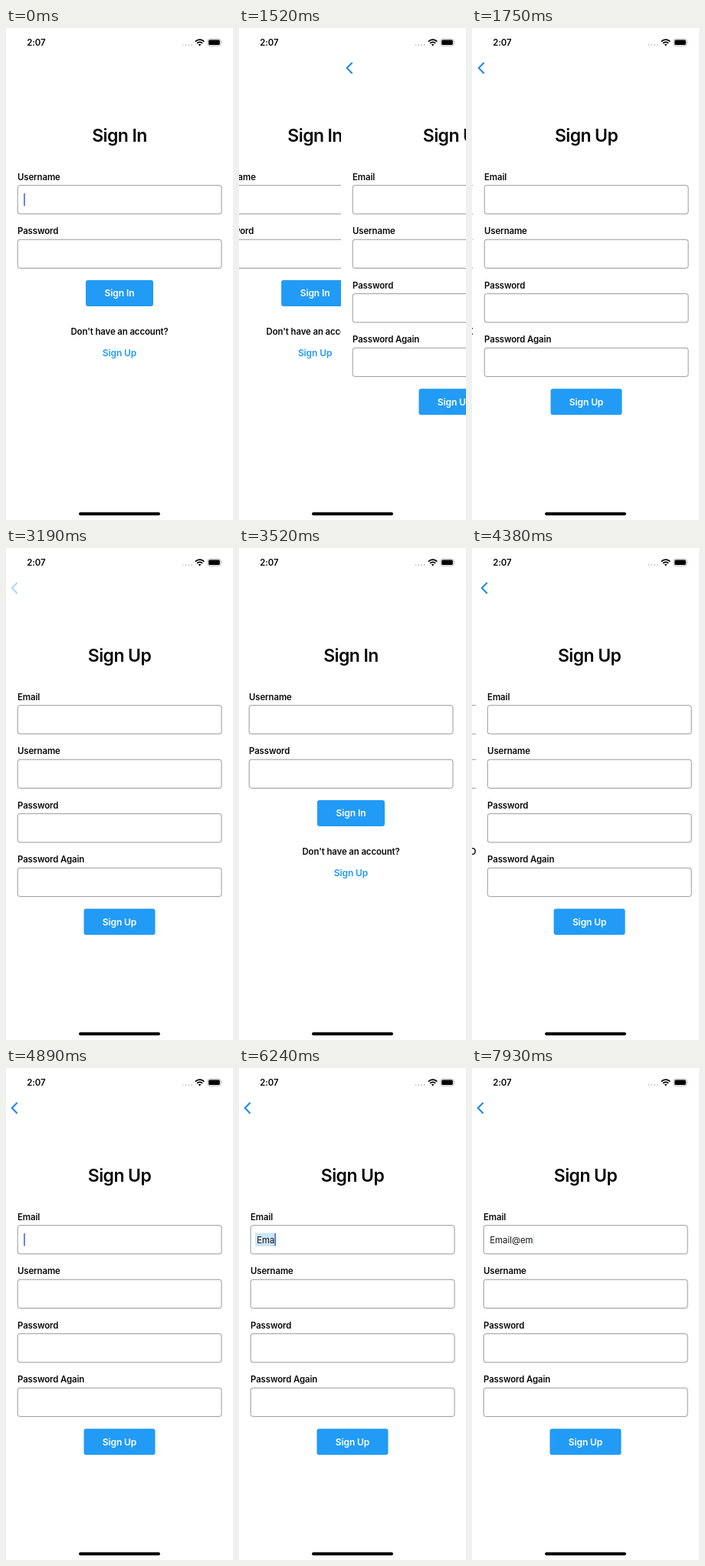
Recreate the animation shown at these times as an HTML page. Size 296x640 px, loop 8000 ms.

```html
<!DOCTYPE html>
<html lang="en">
<head>
<meta charset="utf-8">
<title>Sign in and sign up</title>
<style>
  html, body { margin: 0; width: 100%; height: 100%; overflow: hidden; background: #fff; }
  svg { display: block; width: 100%; height: 100%; }
  text { font-family: Inter, "Liberation Sans", sans-serif; font-size: 11.4px; font-weight: 600; letter-spacing: -.1px; fill: #0a0a0a; }
  .mid { text-anchor: middle; }
  .title { font-size: 23px; letter-spacing: -.6px; }
  .action { font-size: 12px; }
  .link { fill: #219bf5; }
  .on-button { fill: #fff; }
  .typed { font-weight: 400; letter-spacing: 0; white-space: pre; fill: #151515; }
  .field { fill: #fff; stroke: #8e8e8e; stroke-width: .9; }
  .button { fill: #219bf5; }
  .caret { fill: #426bd4; }
</style>
</head>
<body>
<svg viewBox="0 0 296 640" xmlns="http://www.w3.org/2000/svg">
  <rect width="296" height="640" fill="#fff"/>
  <g id="signIn"></g>
  <g id="signUp"></g>
  <g id="status">
    <text x="27.3" y="23">2:07</text>
    <g fill="#c4c4c4">
      <circle cx="230.5" cy="22" r=".9"/><circle cx="234.3" cy="22" r=".9"/>
      <circle cx="238.1" cy="22" r=".9"/><circle cx="241.9" cy="22" r=".9"/>
    </g>
    <g fill="none" stroke="#000" stroke-width="1.7">
      <path d="M246.9 17.6a8 8 0 0 1 11.4 0"/>
      <path d="M249.1 19.9a4.9 4.9 0 0 1 7 0"/>
    </g>
    <path d="M250.9 21.6a2.4 2.4 0 0 1 3.4 0l-1.7 1.8z"/>
    <rect x="263" y="14.4" width="17" height="8.8" rx="2.6" fill="none" stroke="#a5a5a5" stroke-width=".8"/>
    <rect x="264.2" y="15.6" width="14.6" height="6.4" rx="1.5"/>
    <path d="M281 17.3q1.3 1.5 0 3z" fill="#a5a5a5"/>
  </g>
  <rect x="95" y="630" width="106" height="4" rx="2"/>
</svg>
<script>
const LOOP = 8000, W = 296, MID = 148;
const PUSH = 1450, POP = 3302, PUSH_AGAIN = 4150;
const FOCUS = 4750, TYPING = 5680, COMMIT = 6920;
const TEXT = "Email@em";
const KEYS = [TYPING, 5900, 6040, 6440, 6580, COMMIT, 7410, 7670];

const $ = id => document.getElementById(id);
const centred = (s, y, cls) => `<text class="mid ${cls}" x="${MID}" y="${y}">${s}</text>`;
const field = (label, i) => `
  <text x="15" y="${197.7 + i * 70.5}">${label}</text>
  <rect class="field" x="15.2" y="${204.7 + i * 70.5}" width="265.8" height="37.2" rx="3"/>`;
const button = (s, y, w) => `
  <rect class="button" x="${MID - w / 2}" y="${y}" width="${w}" height="34" rx="3"/>
  ${centred(s, y + 21.4, "action on-button")}`;
const caret = id => `<rect class="caret" id="${id}" x="23.2" y="215" width="1.6" height="16.5" rx=".6"/>`;

$("signIn").innerHTML =
  centred("Sign In", 147.5, "title") +
  ["Username", "Password"].map(field).join("") +
  caret("nameCaret") +
  button("Sign In", 328, 88) +
  centred("Don't have an account?", 399.4, "") +
  centred("Sign Up", 427.4, "action link");

$("signUp").innerHTML =
  `<rect width="${W}" height="640" fill="#fff"/>
   <path id="back" d="M14.7 45L7.7 52L14.7 59.2" fill="none" stroke="#1e88ee" stroke-width="2"/>` +
  centred("Sign Up", 147.5, "title") +
  ["Email", "Username", "Password", "Password Again"].map(field).join("") +
  `<rect id="marked" x="21" y="214.5" height="17.5" fill="#cfe5f9"/>
   <text class="typed" id="email" x="23.2" y="227.6"></text>` +
  caret("emailCaret") +
  button("Sign Up", 469.2, 93);

const ramp = (t, a, b) => Math.min(1, Math.max(0, (t - a) / (b - a)));

// Critically damped spring: share of the way still to go.
const rest = ms => (1 + .026 * ms) * Math.exp(-.026 * ms);

function pageX(t) {
  if (t < PUSH) return W;
  if (t < POP) return W * rest(t - PUSH);
  if (t < PUSH_AGAIN) return W * (1 - rest(t - POP));
  return W * rest(t - PUSH_AGAIN);
}

function blink(t) {
  const p = (t + 680) % 680;
  return 1 - ramp(p, 100, 210) + ramp(p, 350, 450);
}

function emailCaret(t) {
  if (t < FOCUS) return 0;
  if (t < TYPING) return blink(t - 5080);
  return 1 - ramp(t, 7890, 7940);
}

function draw(t) {
  const x = pageX(t);
  $("signUp").setAttribute("transform", `translate(${x})`);
  $("signIn").setAttribute("transform", `translate(${-.3 * (W - x)})`);
  $("nameCaret").setAttribute("opacity", t < PUSH ? blink(t) : 0);
  $("back").setAttribute("opacity", t >= 3190 && t < PUSH_AGAIN ? .35 + .65 * ramp(t, POP, 3500) : 1);

  const email = $("email");
  email.textContent = TEXT.slice(0, KEYS.filter(k => k <= t).length);
  const end = email.textContent ? 23.2 + email.getComputedTextLength() : 23.2;
  $("emailCaret").setAttribute("x", end);
  $("emailCaret").setAttribute("opacity", emailCaret(t));
  $("marked").setAttribute("width", t >= TYPING && t < COMMIT ? end - 19.4 : 0);
}

const start = performance.now();
function tick() {
  draw((performance.now() - start) % LOOP);
  requestAnimationFrame(tick);
}
tick();
</script>
</body>
</html>
```
